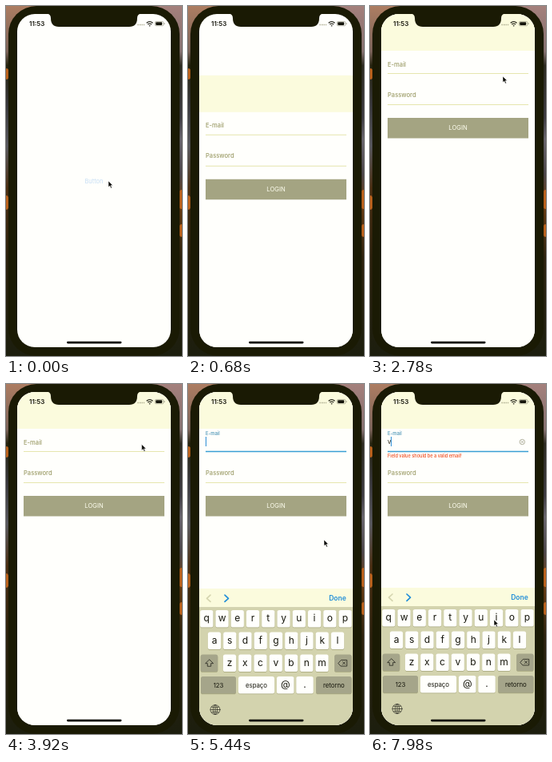
An HTML page for the animation above (8000 ms loop, 220 by 438 pixels).

```html
<!DOCTYPE html>
<html lang="pt">
<head>
<meta charset="utf-8">
<title>Login form</title>
<style>
  html, body { margin: 0; width: 100%; height: 100%; overflow: hidden; background: #1a1a04; }
  svg { display: block; width: 100vw; height: 100vh; font-family: Inter, Roboto, sans-serif; }
  .label { font-size: 7.6px; font-weight: 500; fill: #9c9c68; }
  .rule { stroke: #e6e6ae; stroke-width: 1; }
  .bezel { fill: #1a1a04; }
  .paper { fill: #fffffc; }
  .bar { fill: #fbfbdd; }
  .key { fill: #fffffc; }
  .dark { fill: #a5a58a; }
  .edge { fill: #a6a67c; }
  .glyph { font-size: 12px; fill: #16160c; text-anchor: middle; }
  .word { font-size: 7.8px; }
  .stroke { fill: none; stroke: #33332a; stroke-width: .9; stroke-linejoin: round; stroke-linecap: round; }
</style>
</head>
<body>
<svg viewBox="0 0 220 438" preserveAspectRatio="none">
  <defs>
    <linearGradient id="left" x2="0" y2="1">
      <stop offset="0" stop-color="#ad7d62"/>
      <stop offset=".13" stop-color="#7a6258"/>
      <stop offset=".17" stop-color="#25230f"/>
      <stop offset=".28" stop-color="#37363a"/>
      <stop offset=".4" stop-color="#56565c"/>
      <stop offset=".52" stop-color="#4a2e12"/>
      <stop offset=".72" stop-color="#2a200c"/>
      <stop offset="1" stop-color="#1c1e0e"/>
    </linearGradient>
    <linearGradient id="right" x2="0" y2="1">
      <stop offset="0" stop-color="#a4807c"/>
      <stop offset=".13" stop-color="#84706f"/>
      <stop offset=".17" stop-color="#2c2a20"/>
      <stop offset=".32" stop-color="#3c3a40"/>
      <stop offset=".38" stop-color="#66626a"/>
      <stop offset=".48" stop-color="#4a4448"/>
      <stop offset=".56" stop-color="#6a3c12"/>
      <stop offset=".72" stop-color="#2c220e"/>
      <stop offset="1" stop-color="#1c1e0e"/>
    </linearGradient>
    <clipPath id="screen"><rect x="14" y="10" width="192" height="417" rx="22"/></clipPath>
  </defs>

  <rect width="110" height="438" fill="url(#left)"/>
  <rect x="110" width="110" height="438" fill="url(#right)"/>
  <g fill="#b8601c">
    <ellipse cx="1" cy="85" rx="3" ry="7"/>
    <ellipse cx="1" cy="246" rx="3" ry="9"/>
    <ellipse cx="219" cy="242" rx="4" ry="12"/>
    <ellipse cx="219" cy="281" rx="3" ry="8"/>
  </g>
  <rect class="bezel" x="3" width="214" height="438" rx="35"/>

  <g clip-path="url(#screen)">
    <rect class="paper" x="14" y="10" width="192" height="417"/>
    <text id="button" x="110" y="221.5" font-size="7.5" text-anchor="middle" fill="#2f86e0">Button</text>

    <g id="sheet">
      <rect class="paper" x="14" y="10" width="192" height="430"/>
      <rect class="bar" x="14" y="10" width="192" height="46"/>
      <path id="emailRule" class="rule" d="M22 84.5H198"/>
      <text id="emailLabel" class="label">E-mail</text>
      <path class="rule" d="M22 123.5H198"/>
      <text class="label" x="22" y="113.6">Password</text>
      <rect x="22" y="140" width="176" height="25.5" fill="#a4a482"/>
      <text x="110" y="155.4" font-size="7.6" text-anchor="middle" fill="#fffff0">LOGIN</text>
      <g id="typed">
        <text x="22" y="75" font-size="8" fill="#26261a">v</text>
        <g fill="none" stroke="#9c9c84" stroke-width=".8">
          <circle cx="190.3" cy="72.5" r="3.2"/>
          <path d="M189 71.2l2.6 2.6m0-2.6l-2.6 2.6"/>
        </g>
        <text x="22" y="91.6" font-size="5.6" font-weight="500" fill="#ee4b1e">Field value should be a valid email!</text>
      </g>
      <rect id="caret" y="66" width="1" height="12" fill="#2f8fd6"/>
    </g>

    <g id="keyboard">
      <rect class="bar" x="14" y="255" width="192" height="23"/>
      <rect x="14" y="278" width="192" height="160" fill="#d3d3ae"/>
      <g fill="none" stroke-width="1.7" stroke-linecap="round" stroke-linejoin="round">
        <path d="M28 263l-4.5 4.2 4.5 4.2" stroke="#d6d6b0"/>
        <path d="M46 263l4.5 4.2-4.5 4.2" stroke="#238fd8"/>
      </g>
      <text x="187" y="270.2" font-size="8.5" font-weight="600" text-anchor="middle" fill="#238fd8">Done</text>
      <g id="keys"></g>
      <path class="stroke" d="M26.5 344l-4.8 4.6h2.6v3.6h4.4v-3.6h2.6z"/>
      <path class="stroke" d="M188 348.2l3.3-3.8h7.4v7.6h-7.4zM193.3 346.5l3.4 3.4m0-3.4l-3.4 3.4"/>
      <g class="stroke" style="stroke-width: .7">
        <circle cx="34" cy="406.5" r="6"/>
        <ellipse cx="34" cy="406.5" rx="2.7" ry="6"/>
        <path d="M28 406.5h12M34 400.5v12M29.3 403.1q4.7 1.8 9.4 0M29.3 409.9q4.7-1.8 9.4 0"/>
      </g>
    </g>

    <rect x="76" y="419.8" width="68.5" height="2.6" rx="1.3" fill="#0d0d06"/>
    <text x="29" y="25" font-size="8" font-weight="600" fill="#15150b">11:53</text>
    <path d="M164.5 23.5H173" stroke="#a3a384" stroke-width="1.3" stroke-dasharray="1.3 1.2"/>
    <g fill="none" stroke="#15150b" stroke-width="1.2">
      <path d="M175.7 21.2q3.9-3.4 7.8 0M177.3 23q2.3-2 4.6 0"/>
      <circle cx="179.6" cy="24.6" r=".3"/>
    </g>
    <rect x="186.3" y="19.4" width="10.6" height="5.4" rx="1.5" fill="none" stroke="#8c8c78" stroke-width=".6"/>
    <rect x="187.2" y="20.3" width="8" height="3.6" rx=".8" fill="#15150b"/>
    <path d="M198 21.2v1.8" stroke="#8c8c78" stroke-width=".8"/>
  </g>

  <path class="bezel" d="M50 9Q56 10 56 15Q56 26 66 26H154Q164 26 164 15Q164 10 170 9Z"/>
  <path id="cursor" d="M0 0V7.6L1.8 6L3.1 9L4.4 8.4L3.1 5.5H5.5Z" fill="#080804" stroke="#fffffc" stroke-width=".5"/>
</svg>

<script>
const LOOP = 8000, PRESENT = 218, FOCUS = 4370, TYPE = 7000;
const $ = id => document.getElementById(id);
const clamp = v => Math.min(1, Math.max(0, v));
const smooth = v => v * v * (3 - 2 * v);

// Critically damped spring: remaining distance from 1 to 0.
function spring(ms) {
  const x = Math.max(0, ms) / 149;
  return (1 + x) * Math.exp(-x);
}

function key(cx, cy, width, text, kind = "key", size = "") {
  const x = cx - width / 2, y = cy - 11;
  const box = (dy, cls) =>
    `<rect x="${x}" y="${y + dy}" width="${width}" height="21.5" rx="2.6" class="${cls}"/>`;
  const drop = size ? 2.7 : 3.4;
  return box(.8, "edge") + box(0, kind) +
    `<text x="${cx}" y="${cy + drop}" class="glyph ${size}">${text}</text>`;
}

const row = (letters, left, y) =>
  [...letters].map((c, i) => key(left + i * 19.25, y, 16.2, c)).join("");

$("keys").innerHTML =
  row("qwertyuiop", 23.3, 293) + row("asdfghjkl", 33, 320.5) + row("zxcvbnm", 52, 348.5) +
  key(26.5, 348.5, 21.5, "", "dark") + key(193.8, 348.5, 21.5, "", "dark") +
  key(38, 376, 44, "123", "dark", "word") + key(85.5, 376, 45, "espaço", "key", "word") +
  key(121.7, 376, 21.5, "@") + key(146, 376, 21.5, ".") +
  key(182.3, 376, 44.5, "retorno", "dark", "word");

// Pointer stops: time, x, y
const stops = [
  [0, 128, 219], [1700, 162, 100], [2780, 166, 88], [4200, 170, 74], [4850, 170, 74],
  [5440, 170, 195], [6500, 109, 345], [7100, 109, 345], [7960, 155, 295], [LOOP, 155, 295]
];

function pointer(t) {
  if (t < 1700) return stops[0].slice(1);
  const i = stops.findIndex(s => s[0] > t);
  const [t0, x0, y0] = stops[i - 1], [t1, x1, y1] = stops[i];
  const p = smooth((t - t0) / (t1 - t0));
  return [x0 + (x1 - x0) * p, y0 + (y1 - y0) * p];
}

const move = (id, x, y, extra = "") => $(id).setAttribute("transform", `translate(${x} ${y})${extra}`);
const show = (id, on) => $(id).style.display = on ? "" : "none";

function render(t) {
  const focused = t >= FOCUS, typed = t >= TYPE;
  $("button").style.opacity = .27 + .73 * clamp((t - 120) / 260);
  move("sheet", 0, 418 * spring(t - PRESENT));
  move("keyboard", 0, 173 * spring(t - FOCUS));

  const lift = smooth(clamp((t - FOCUS + 20) / 440));
  move("emailLabel", 22, 75.6 - 11.5 * lift, ` scale(${1 - .23 * lift})`);
  $("emailLabel").style.fill = focused ? "#4792b4" : "";
  $("emailRule").style.stroke = focused ? "#3a9fd4" : "";
  $("emailRule").style.strokeWidth = focused ? 1.4 : "";

  show("caret", focused);
  $("caret").setAttribute("x", typed ? 26 : 22);
  show("typed", typed);
  show("cursor", t < 450 || t >= 1700);
  move("cursor", ...pointer(t));
}

const start = performance.now();
function tick() {
  render((performance.now() - start) % LOOP);
  requestAnimationFrame(tick);
}
tick();
</script>
</body>
</html>
```
